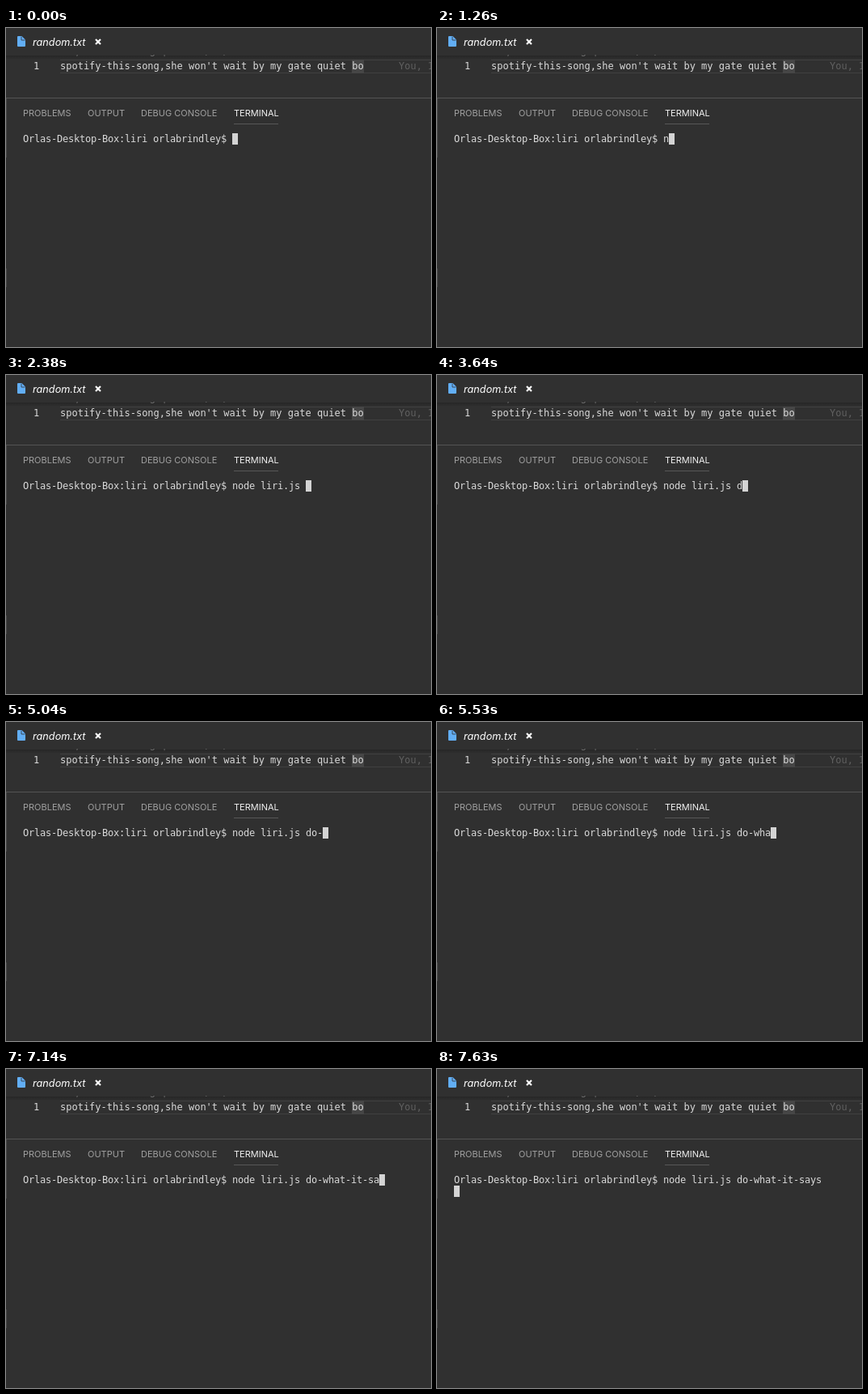
Write an HTML page that moves like this. It is 526 px wide and 394 px high and loops after 8000 ms.

```html
<!DOCTYPE html>
<html lang="en">
<head>
<meta charset="utf-8">
<title>Terminal typing</title>
<style>
  html, body { margin: 0; width: 100%; height: 100%; overflow: hidden; background: #303030; }
  svg { display: block; width: 526px; height: 394px; }
  text { white-space: pre; }
  .mono { font: 12px "DejaVu Sans Mono", monospace; fill: #d9d9d9; }
  .cell { letter-spacing: -0.224px; }
  .ui { font: 11px Inter, sans-serif; fill: #a0a0a0; }
  .name { font: italic 12.7px Inter, sans-serif; fill: #fff; }
</style>
</head>
<body>
<svg viewBox="0 0 526 394">
  <defs>
    <linearGradient id="shade" x2="0" y2="1">
      <stop offset="0" stop-color="#202020" stop-opacity=".6"/>
      <stop offset="1" stop-color="#202020" stop-opacity="0"/>
    </linearGradient>
    <clipPath id="editor"><rect y="33" width="526" height="53"/></clipPath>
  </defs>
  <rect width="526" height="394" fill="#303030"/>

  <!-- editor -->
  <g clip-path="url(#editor)">
    <rect y="34" width="526" height="5" fill="url(#shade)"/>
    <text class="ui" x="67" y="33" style="fill:#777">You, a few seconds ago | 1 author (You)</text>
    <path d="M67 39.5H526M67 55.5H526" stroke="#404040"/>
    <rect x="428" y="39" width="15" height="17" fill="#464646"/>
    <text class="mono" x="34" y="51">1</text>
    <text class="mono" x="67" y="51">spotify-this-song,she won't wait by my gate quiet bo</text>
    <text class="mono" x="486" y="51" style="fill:#606060">You, 1 second ago</text>
  </g>

  <!-- file tab -->
  <rect width="526" height="33" fill="#303030"/>
  <path d="M15 10h4.500l4.500 4.500V22q0 1-1 1H15q-1 0-1-1V11q0-1 1-1z" fill="#62aef5"/>
  <path d="M19 10.500v4.500h4.500" fill="none" stroke="#303030" stroke-width=".8"/>
  <text class="name" x="33" y="22">random.txt</text>
  <path d="M111 14l6 6m0-6l-6 6" stroke="#fff" stroke-width="2.200"/>

  <!-- panel -->
  <path d="M0 86.500H526" stroke="#545454"/>
  <path d="M.5 87V160M.5 297V320" stroke="#484848"/>
  <g class="ui">
    <text x="21" y="109">PROBLEMS</text>
    <text x="101" y="109">OUTPUT</text>
    <text x="167" y="109">DEBUG CONSOLE</text>
    <text x="282" y="109" style="fill:#f0f0f0">TERMINAL</text>
  </g>
  <path d="M282 118.500H337" stroke="#585858"/>
  <text id="line" class="mono cell" x="21" y="141"></text>
  <rect id="cursor" width="7" height="14" fill="#d4d4d4"/>
</svg>
<script>
  const LOOP = 8000, LEFT = 21, TOP = 130, CELL = 7, ROW = 14;
  const PROMPT = "Orlas-Desktop-Box:liri orlabrindley$ ";
  const line = document.getElementById("line");
  const cursor = document.getElementById("cursor");

  // [time, keys]; "<" is backspace, "\n" is return
  const strokes = [
    ...[..."node li"].map((key, i) => [1260 + 140 * i, key]),
    [2380, "ri.js "],
    [3640, "d"], [3780, "o"], [4410, "="], [4900, "<"], [5040, "-"],
    [5180, "w"], [5320, "h"], [5530, "a"], [5740, "t"], [5880, "-"],
    [6160, "i"], [6580, "t"],
    ...[..."-says"].map((key, i) => [6860 + 140 * i, key]),
    [7630, "\n"]
  ];

  function draw(time) {
    let text = PROMPT, row = 0;
    for (const [at, keys] of strokes) {
      if (at > time) break;
      if (keys === "<") text = text.slice(0, -1);
      else if (keys === "\n") row = 1;
      else text += keys;
    }
    line.textContent = text;
    cursor.setAttribute("x", LEFT + (row ? 0 : text.length * CELL));
    cursor.setAttribute("y", TOP + row * ROW);
  }

  const start = performance.now();
  function tick() {
    draw((performance.now() - start) % LOOP);
    requestAnimationFrame(tick);
  }
  tick();
</script>
</body>
</html>
```
